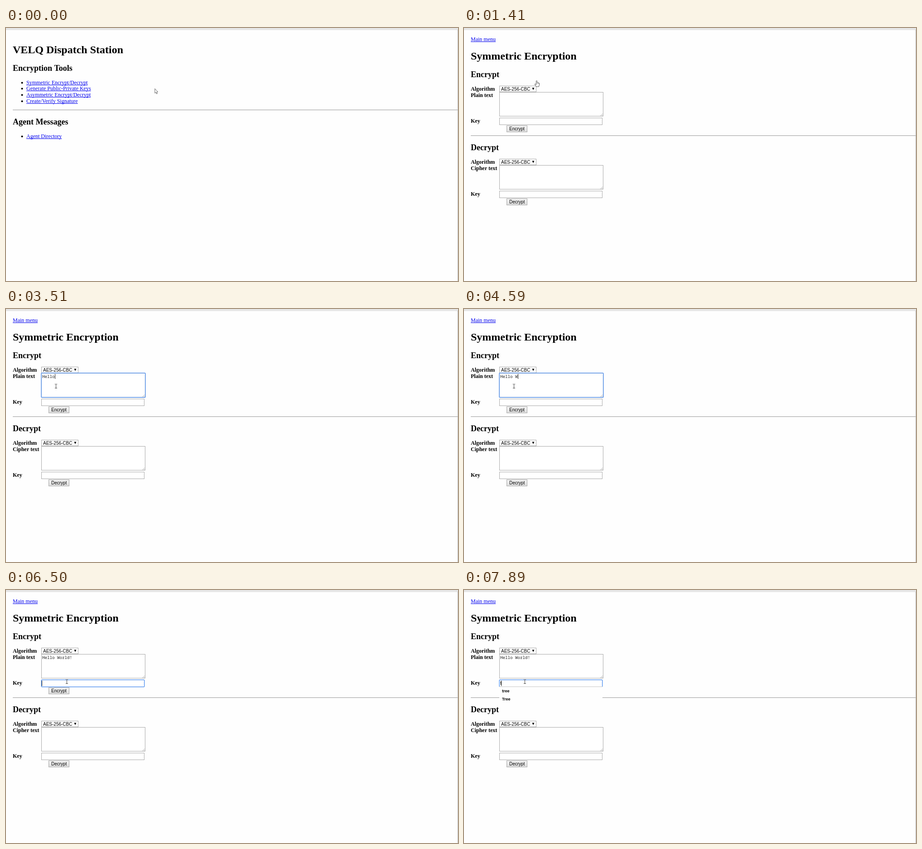
Animation, 999 px wide and 561 px high, one loop 8000 ms. Source, as an HTML page with a canvas:

```html
<!DOCTYPE html>
<html lang="en">
<head>
<meta charset="utf-8">
<title>Message tools</title>
<style>
html, body { margin: 0; width: 100%; height: 100%; overflow: hidden; background: #fefefe; }
canvas { display: block; }
</style>
</head>
<body>
<canvas id="stage" width="999" height="561"></canvas>
<script>
const ctx = document.getElementById('stage').getContext('2d');
const LOOP = 8000, BLINK = 560;
const PAGE_SWITCH = 1410, FOCUS_TEXT = 1970, FOCUS_KEY = 6500, TYPE_KEY = 7890;
const SERIF = '"Liberation Serif", serif', SANS = '"Liberation Sans", sans-serif';
const BODY = `12px ${SERIF}`, LABEL = `bold 12px ${SERIF}`;
const H1 = `bold 24px ${SERIF}`, H2 = `bold 18px ${SERIF}`;
const CONTROL = `10px ${SANS}`, MONO = '9.17px "Noto Sans Mono", monospace';
const MESSAGE = 'Hello World!', CHAR = 5.5;
// [time, number of characters typed]
const TYPING = [[2680, 1], [2960, 2], [3140, 3], [3330, 4], [3510, 5], [4010, 6],
  [4590, 7], [4780, 8], [4960, 10], [5150, 11], [5550, 12]];

function text(str, x, y, font, color = '#000') {
  ctx.font = font;
  ctx.fillStyle = color;
  ctx.fillText(str, x, y);
}

function rect(x, y, w, h, color) {
  ctx.fillStyle = color;
  ctx.fillRect(x, y, w, h);
}

function box(x, y, w, h, border = '#a9a9a9', fill = '#fff') {
  rect(x, y, w, h, border);
  rect(x + 1, y + 1, w - 2, h - 2, fill);
}

function link(str, x, y) {
  text(str, x, y, BODY, '#00e');
  rect(x, y + 1, ctx.measureText(str).width, 1, '#00e');
}

function listItem(str, y) {
  ctx.fillStyle = '#000';
  ctx.beginPath();
  ctx.arc(35.5, y - 3.5, 2, 0, 7);
  ctx.fill();
  link(str, 45, y);
}

function rule(y) {
  rect(15, y, 984, 1, '#a4a4a4');
  rect(15, y + 1, 984, 1, '#ededed');
}

function focusRing(x, y, w, h) {
  ctx.strokeStyle = '#5b97f0';
  ctx.lineWidth = 1.5;
  ctx.beginPath();
  ctx.roundRect(x, y, w, h, 1);
  ctx.stroke();
}

function shape(points, fill, stroke) {
  ctx.beginPath();
  points.forEach(([x, y]) => ctx.lineTo(x, y));
  ctx.closePath();
  ctx.fillStyle = fill;
  ctx.fill();
  if (!stroke) return;
  ctx.strokeStyle = stroke;
  ctx.lineWidth = 0.9;
  ctx.stroke();
}

function menuPage() {
  text('VELQ Dispatch Station', 15, 56, H1);
  text('Encryption Tools', 15, 95, H2);
  ['Symmetric Encrypt/Decrypt', 'Generate Public-Private Keys',
    'Asymmetric Encrypt/Decrypt', 'Create/Verify Signature']
    .forEach((item, i) => listItem(item, Math.floor(125 + i * 13.75)));
  rule(181);
  text('Agent Messages', 15, 214, H2);
  listItem('Agent Directory', 244);
}

function form(title, textLabel, dy) {
  ctx.save();
  ctx.translate(0, dy);
  text(title, 15, 109, H2);
  text('Algorithm', 15, 139, LABEL);
  text(textLabel, 15, 153, LABEL);
  text('Key', 15, 210, LABEL);

  box(78, 128, 82, 14);
  text('AES-256-CBC', 82, 139, CONTROL);
  shape([[150.5, 132.5], [155.5, 132.5], [153, 137.5]], '#000');

  box(78, 142, 230, 54);
  ctx.strokeStyle = '#999';
  ctx.lineWidth = 0.8;
  ctx.beginPath();
  for (const d of [2, 5]) {
    ctx.moveTo(306.5 - d, 195);
    ctx.lineTo(306.5, 195 - d);
  }
  ctx.stroke();

  box(78, 199, 228, 16);
  const shade = ctx.createLinearGradient(0, 216, 0, 231);
  shade.addColorStop(0, '#f6f6f6');
  shade.addColorStop(1, '#dcdcdc');
  box(94, 216, 46, 15, '#a6a6a6', shade);
  text(title, 100, 227, CONTROL);
  ctx.restore();
}

function formPage(t) {
  link('Main menu', 15, 29);
  text('Symmetric Encryption', 15, 70, H1);
  form('Encrypt', 'Plain text', 0);
  rule(238);
  form('Decrypt', 'Cipher text', 162);

  const [typedAt, count] = TYPING.filter(([at]) => at <= t).pop() || [FOCUS_TEXT, 0];
  text(MESSAGE.slice(0, count), 80, 153, MONO, '#222');
  if (t < FOCUS_TEXT) return;

  const inKey = t >= FOCUS_KEY, keyTyped = t >= TYPE_KEY;
  const lastInput = keyTyped ? TYPE_KEY : inKey ? FOCUS_KEY : typedAt;
  const caretOn = Math.floor((t - lastInput) / BLINK) % 2 === 0;
  if (inKey) focusRing(78.25, 199.25, 227.5, 15.5);
  else focusRing(78, 142, 230, 54);
  if (keyTyped) {
    text('t', 80, 210, CONTROL);
    rect(78, 214, 228, 38, '#fefefe');
    rect(78, 214, 228, 1, '#c8c8c8');
    text('tree', 84, 227, `bold 9px ${SANS}`);
    text('Tree', 84, 245, `bold 9px ${SANS}`);
  }
  if (!caretOn) return;
  if (inKey) rect(keyTyped ? 82 : 79, 201, 1, 12, '#222');
  else rect(Math.round(80 + count * CHAR), 144, 1, 11, '#222');
}

// Eased progress sampled in discrete jumps, the first at start and the last at end.
function stepped(t, start, end, steps) {
  const k = Math.floor((t - start) / (end - start) * (steps - 1) + 1e-6) + 1;
  const p = Math.min(steps, Math.max(0, k)) / steps;
  return p * p * (3 - 2 * p);
}

const mix = (a, b, p) => a + (b - a) * p;

const cursors = {
  arrow() {
    shape([[0, 0], [0, 10], [2.3, 8], [3.8, 11.5], [5.4, 10.9], [4, 7.4], [6.6, 7.2]], '#fff', '#555');
  },
  hand() {
    shape([[-1.5, 0.8], [-0.5, 0], [0.6, 0.8], [0.7, 4.6], [2.6, 4.8], [4.6, 5.4], [5.5, 6.4],
      [5.4, 9.5], [4.4, 13.5], [-1.4, 13.5], [-4.6, 8.6], [-4.3, 7.6], [-3.2, 7.6], [-1.5, 9.3]], '#fff', '#444');
    for (const x of [0.6, 2.4, 4]) rect(x, 5, 0.6, 2.2, '#555');
  },
  beam() {
    rect(-0.5, -4, 1, 9, '#444');
    for (const y of [-5, 4]) {
      rect(-2.5, y, 2, 1, '#444');
      rect(0.5, y, 2, 1, '#444');
    }
  }
};

function pointer(t) {
  if (t < PAGE_SWITCH) {
    const p = stepped(t, 280, 980, 6), q = 1 - p;
    const curve = (a, b, c) => a * q * q + 2 * b * p * q + c * p * p;
    return [p === 1 ? 'hand' : 'arrow', curve(329, 230, 161), curve(134.5, 60, 116.5)];
  }
  if (t < 6070) {
    const p = stepped(t, 1570, FOCUS_TEXT, 4);
    const y = mix(116.5, 171, p);
    return [p === 0 ? 'hand' : y < 142 ? 'arrow' : 'beam', mix(161, 110.5, p), y];
  }
  const p = stepped(t, 6070, FOCUS_KEY, 4);
  return ['beam', mix(110.5, 134.5, p), mix(171, 203, p)];
}

function draw(now) {
  const t = now % LOOP;
  rect(0, 0, 999, 561, '#fefefe');
  rect(0, 0, 999, 1, '#c0c0c0');
  rect(0, 3, 999, 1, '#c0c0c0');
  if (t < PAGE_SWITCH) menuPage();
  else formPage(t);
  rect(998, 3, 1, 558, '#b8b8b8');

  const [kind, x, y] = pointer(t);
  ctx.save();
  ctx.translate(x, y);
  cursors[kind]();
  ctx.restore();
}

const began = performance.now();
function tick() {
  draw(performance.now() - began);
  requestAnimationFrame(tick);
}
tick();
</script>
</body>
</html>
```
